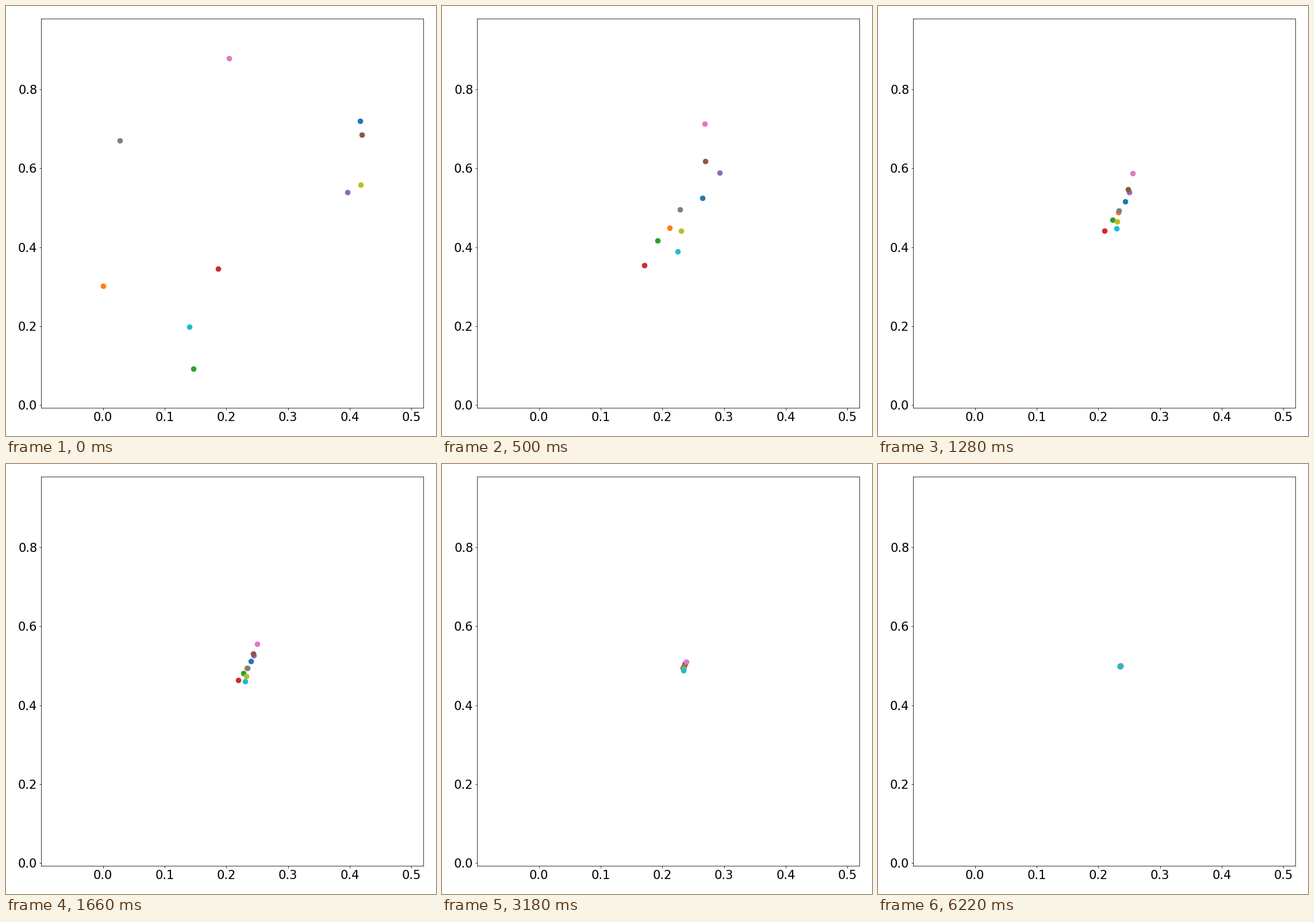
These frames come from a looping animation (748 by 748 pixels, 6.54 s). A matplotlib script:

```python
import numpy as np
import matplotlib.pyplot as plt
from matplotlib.animation import FuncAnimation

SIZE = 748
DPI = 64
PX = 72 / DPI  # points per pixel
TICK_MS = 20
FRAMES = 327

# Ten agents average their positions with their neighbours along these chains.
AGENTS = 10
CHAINS = [(3, 2, 1, 0, 4, 5, 6), (2, 7, 5), (7, 8, 9)]
GAIN = 0.05

# One step per frame at first, then gradually falling behind.
SLOW_FROM = 133
TOTAL_LAG = 27


def step_at(frame):
    late = max(0, frame - SLOW_FROM) / (FRAMES - SLOW_FROM)
    return int(frame - TOTAL_LAG * late ** 1.5)


def simulate():
    links = np.zeros((AGENTS, AGENTS))
    for chain in CHAINS:
        for i, j in zip(chain, chain[1:]):
            links[i, j] = links[j, i] = 1
    laplacian = np.diag(links.sum(axis=0)) - links
    update = np.eye(AGENTS) - GAIN * laplacian

    np.random.seed(1)
    path = [np.random.rand(AGENTS, 2)]
    for _ in range(step_at(FRAMES)):
        path.append(update @ path[-1])
    return path


def make_axes(fig, start):
    left, right, top, bottom = 61.4, 725.9, 22.48, 699.48
    ax = fig.add_axes([left / SIZE, 1 - bottom / SIZE,
                       (right - left) / SIZE, (bottom - top) / SIZE])
    low, high = start.min(axis=0) - 0.1, start.max(axis=0) + 0.1
    ax.set_xlim(low[0], high[0])
    ax.set_ylim(low[1], high[1])
    ax.set_xticks(np.arange(6) / 10)
    ax.set_yticks(np.arange(5) / 5)
    ax.tick_params(labelsize=21 * PX, length=3.5 * PX,
                   width=0.8 * PX, pad=3.5 * PX)
    for spine in ax.spines.values():
        spine.set_linewidth(0.8 * PX)
    return ax


path = simulate()
plt.rcParams["font.family"] = "DejaVu Sans"
fig = plt.figure(figsize=(SIZE / DPI, SIZE / DPI), dpi=DPI, facecolor="white")
ax = make_axes(fig, path[0])
dots = [ax.plot([x], [y], "o", color=f"C{i}", markersize=8.6 * PX,
                markeredgewidth=PX)[0]
        for i, (x, y) in enumerate(path[0])]


def draw(frame):
    for dot, (x, y) in zip(dots, path[step_at(frame)]):
        dot.set_data([x], [y])
    return dots


anim = FuncAnimation(fig, draw, frames=FRAMES, interval=TICK_MS,
                     repeat=True, repeat_delay=0)
plt.show()
```
